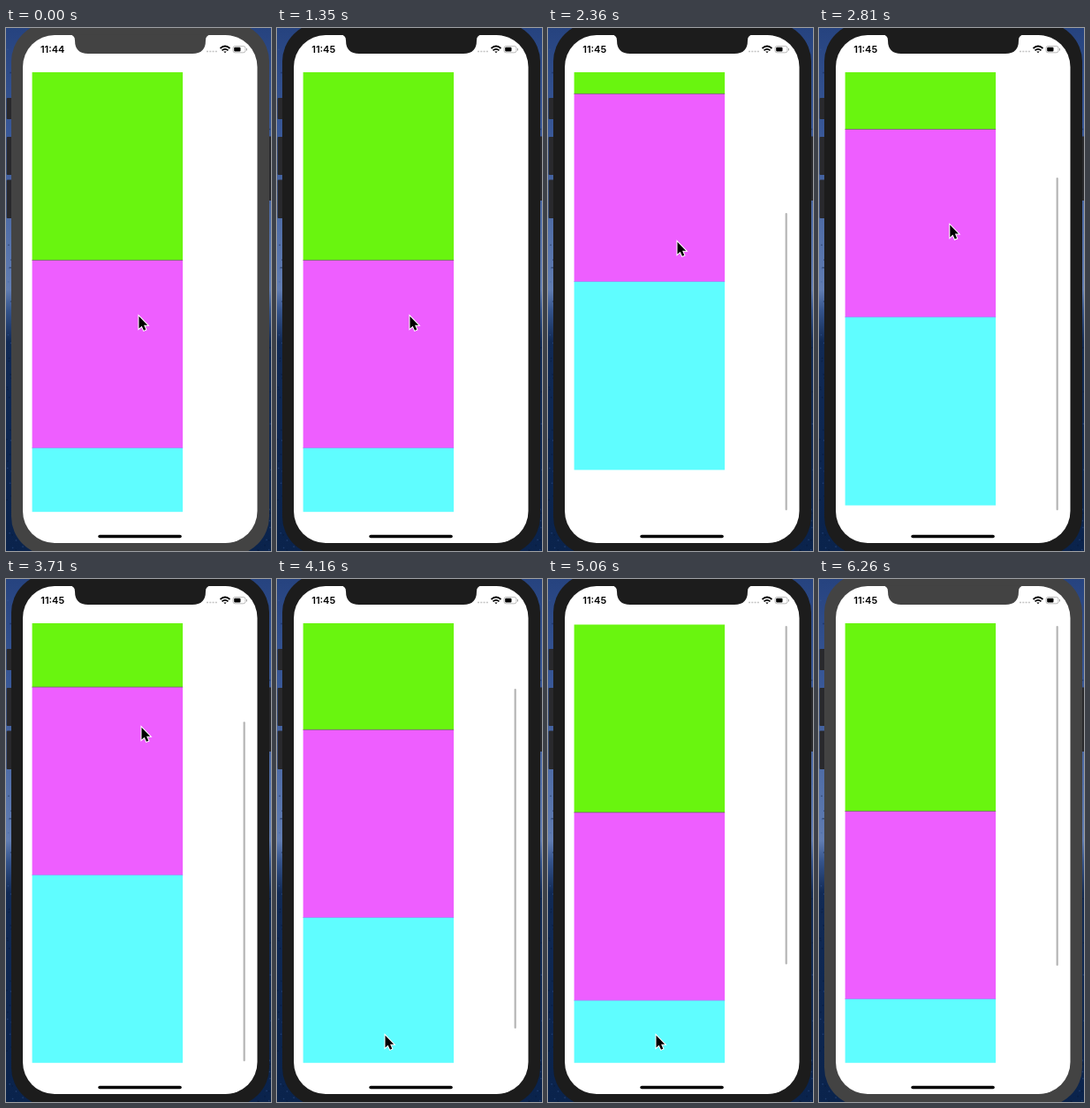
Recreate the animation shown at these times as an HTML page. Size 300 px wide and 591 px high, loop 6360 ms.

```html
<!DOCTYPE html>
<html lang="en">
<head>
<meta charset="utf-8">
<title>Scrolling blocks</title>
<style>
  html, body { margin: 0; width: 100%; height: 100%; overflow: hidden; }
  svg { display: block; width: 100%; height: 100%; }
  #body { fill: #434343; }
  .active #body { fill: #1c1c1c; }
  #clock { font: 600 11px Inter, "Liberation Sans", sans-serif; text-anchor: middle; }
</style>
</head>
<body>
<svg id="stage" viewBox="0 0 300 591">
  <defs>
    <linearGradient id="sky" x2="0" y2="1">
      <stop offset="0" stop-color="#26437f"/>
      <stop offset=".2" stop-color="#395898"/>
      <stop offset=".5" stop-color="#617db2"/>
      <stop offset=".54" stop-color="#35548c"/>
      <stop offset=".6" stop-color="#112a55"/>
      <stop offset="1" stop-color="#0a234c"/>
    </linearGradient>
    <clipPath id="viewport"><rect x="29.600" y="50" width="170.500" height="496.700"/></clipPath>
  </defs>

  <rect width="300" height="591" fill="url(#sky)"/>
  <g id="specks"></g>
  <g fill="#29292c">
    <rect x=".7" y="79" width="8" height="24" rx="1"/>
    <rect x=".7" y="123" width="8" height="43" rx="1"/>
    <rect x=".7" y="171.500" width="8" height="43.500" rx="1"/>
    <rect x="296" y="122.500" width="5" height="72.500"/>
  </g>
  <g id="body">
    <rect x="6" y="-6" width="292" height="602" rx="44"/>
    <rect x="19" y="8" width="265.500" height="574" rx="36" style="fill:#fff"/>
    <path d="M72 7.500 Q78 8 78 14 Q78 29 93 29 H211 Q226 29 226 14 Q226 8 232 7.500 Z"/>
  </g>

  <text id="clock" x="52.700" y="28">11:44</text>
  <path d="M227 26.500 h12" stroke="#c4c4c4" stroke-width="1.400" stroke-dasharray="2 1.300"/>
  <g fill="none" stroke="#000" stroke-width="1.700">
    <path d="M242.500 23 Q248 18 253.500 23"/>
    <path d="M244.500 25.300 Q248 22.300 251.500 25.300"/>
    <path d="M246.300 26.500 h3.400 L248 28.300 Z" fill="#000" stroke="none"/>
  </g>
  <rect x="257" y="20.500" width="14" height="7.300" rx="2.200" fill="none" stroke="#aaa" stroke-width=".8"/>
  <rect x="258.200" y="21.700" width="7.300" height="4.900" rx="1"/>
  <path d="M272.500 23 v2.500" stroke="#aaa"/>

  <g clip-path="url(#viewport)"><g id="blocks"></g></g>
  <rect id="bar" x="268.600" width="2.200" rx="1.100" fill="#b5b5b5"/>
  <rect x="104.300" y="572.700" width="94.500" height="3.500" rx="1.750"/>
  <path id="cursor" d="M0 0 V13.800 L3.200 10.900 L5.500 16 L7.800 15 L5.600 10 H9.700 Z"
        stroke="#fff" stroke-width="2" paint-order="stroke"/>
</svg>
<script>
const LOOP = 6360, START = 1350, BLUR = 6260, STEP = 150, PHASE = 110;
const TOP = 50, BLOCK = 212.3, MAX_SCROLL = 140;
const TRACK_TOP = 53, BAR_LENGTH = 384, BAR_TRAVEL = 108;

const byId = id => document.getElementById(id);
const [stage, clock, blocks, bar, cursor] =
  ["stage", "clock", "blocks", "bar", "cursor"].map(byId);

function addRect(parent, attrs) {
  const rect = document.createElementNS(stage.namespaceURI, "rect");
  for (const name in attrs) rect.setAttribute(name, attrs[name]);
  parent.append(rect);
}

["#69f50f", "#ee5eff", "#5ffdff"].forEach((fill, i) =>
  addRect(blocks, { x: 29, y: TOP + i * BLOCK, width: 172, height: BLOCK + 0.5, fill }));
["#6f6a68", "#a08cf6"].forEach((fill, i) =>
  addRect(blocks, { x: 29, y: TOP + (i + 1) * BLOCK - 0.4, width: 172, height: 0.8, fill }));

// Faint grain in the wallpaper, denser towards the bottom
let seed = 7;
const random = () => (seed = seed * 16807 % 2147483647) / 2147483647;
for (let i = 0; i < 200; i++) {
  addRect(byId("specks"), {
    x: random() < 0.7 ? random() * 22 : 278 + random() * 22,
    y: 591 * Math.sqrt(random()), width: 1.5, height: 1.5,
    fill: random() < 0.6 ? "#061530" : "#3f63a0", opacity: 0.4
  });
}

function ease(t, from, to) {
  const u = Math.min(Math.max((t - from) / (to - from), 0), 1);
  return u * u * (3 - 2 * u);
}
const settle = (t, from, tau) => Math.exp(-Math.max(t - from, 0) / tau);

// Drag past the end, spring back, drag past the start, spring back
function scrollAt(t) {
  if (t < 4460) {
    return (MAX_SCROLL + 48 * settle(t, 2360, 250)) * ease(t, 1878, 2360)
      - 48 * ease(t, 3710, 4160);
  }
  return -54 * settle(t, 4760, 84);
}

const moves = [
  { from: 1460, to: 1910, x: 167, y: 63 },
  { from: 1910, to: 2360, x: 146, y: 241 },
  { from: 2510, to: 3410, x: 153, y: 167 },
  { from: 3710, to: 4160, x: 122, y: 515 },
  { from: 5210, to: 5660, x: 138, y: 612 }
];

function cursorAt(t) {
  return moves.reduce((p, m) => {
    const k = ease(t, m.from, m.to);
    return { x: p.x + (m.x - p.x) * k, y: p.y + (m.y - p.y) * k };
  }, { x: 150, y: 325 });
}

function draw(t) {
  const started = t >= START;
  // The picture updates every 150 ms
  const tick = Math.floor((t - PHASE) / STEP) * STEP + PHASE;
  const offset = scrollAt(tick);
  const { x, y } = cursorAt(tick);

  stage.classList.toggle("active", started && t < BLUR);
  clock.textContent = started ? "11:45" : "11:44";
  blocks.setAttribute("transform", `translate(0 ${-offset})`);
  cursor.setAttribute("transform", `translate(${x + 0.5} ${y + 0.8})`);

  const inside = Math.min(Math.max(offset, 0), MAX_SCROLL);
  const over = offset - inside;
  bar.setAttribute("y", TRACK_TOP + inside / MAX_SCROLL * BAR_TRAVEL + Math.max(over, 0));
  bar.setAttribute("height", BAR_LENGTH - Math.abs(over));
  bar.setAttribute("visibility", tick >= 1910 ? "visible" : "hidden");
}

const origin = performance.now();
function frame() {
  draw((performance.now() - origin) % LOOP);
  requestAnimationFrame(frame);
}
frame();
</script>
</body>
</html>
```
